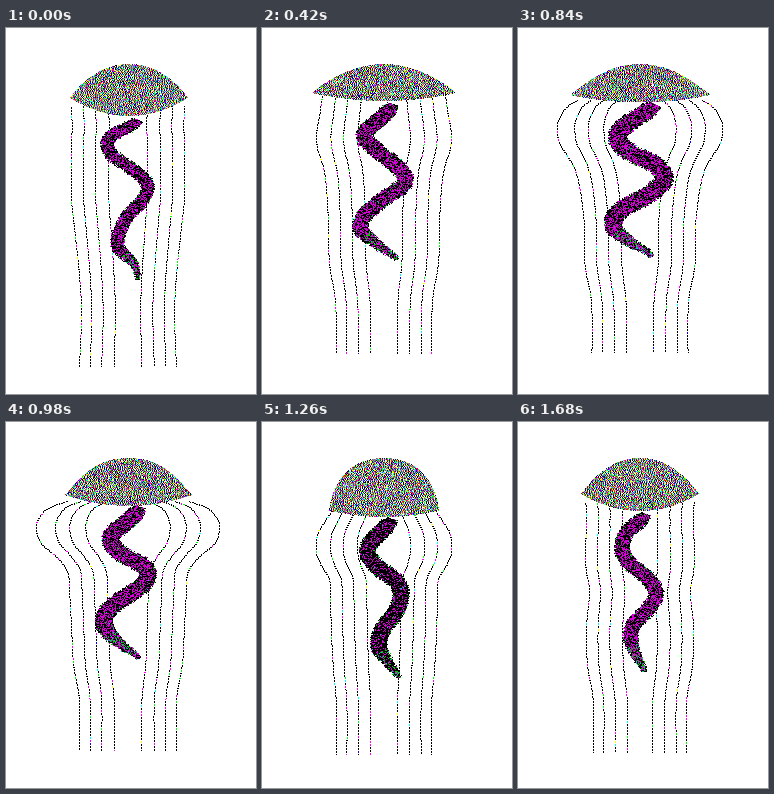
These frames come from a looping animation (250x366 px, 1820 ms). An HTML page with a canvas:

```html
<!DOCTYPE html>
<html lang="en">
<head>
<meta charset="utf-8">
<title>Jellyfish</title>
<style>
html, body { margin: 0; width: 100%; height: 100%; overflow: hidden; background: #fff; }
canvas { display: block; width: 250px; height: 366px; }
</style>
</head>
<body>
<canvas id="stage" width="250" height="366"></canvas>
<script>
const ctx = document.getElementById('stage').getContext('2d');
const STEP = 140, POSES = 13, TOP = 36, MIRROR = 243;
const KEYS = [0, 3, 5, 7, 8, 10, 12];

// left tip x, right tip x, tip y, shoulder dx, shoulder y, crown handle, lower edge y
const BELL = [
  [64, 182, 70, 14, 50, 24, 88],
  [50, 194, 65, 18, 49, 26, 73],
  [45, 199, 61, 25, 47, 26, 65],
  [59, 186, 73, 16, 55, 33, 84],
  [64, 180, 85, 8, 57, 35, 93],
  [70, 174, 92, 0, 61, 33, 97],
  [63, 181, 72, 15, 52, 26, 89]
];

// top y, bottom y, then x of the outer left strand at each FRACTION
const FRACTION = [0, .03, .08, .12, .17, .22, .28, .36, .5, .65, .8, 1];
const STRAND = [
  [78, 338, 65, 65, 66, 65, 65, 65, 65, 65, 69, 73, 75, 73],
  [67, 325, 60, 59, 57, 55, 54, 56, 61, 64, 66, 67, 73, 74],
  [65, 321, 57, 54, 49, 48, 47, 49, 53, 61, 67, 66, 73, 74],
  [79, 328, 61, 41, 31, 30, 35, 49, 61, 63, 65, 67, 73, 73],
  [86, 330, 67, 60, 48, 45, 45, 53, 67, 67, 68, 70, 73, 73],
  [92, 335, 72, 69, 65, 63, 63, 64, 67, 69, 70, 72, 75, 75],
  [80, 330, 67, 68, 68, 68, 67, 67, 68, 71, 68, 69, 75, 75]
];
const REST = [66, 78, 90, 103], SWAY = [1, .8, .74, .65];

// top y, bottom y, width, share of black, then x at equal steps down
const ARM = [
  [92, 251, 11, .58, 132, 104, 103, 124, 141, 136, 121, 113, 112, 127, 131],
  [76, 231, 14, .55, 131, 116, 101, 115, 134, 143, 123, 104, 98, 114, 134],
  [68, 219, 17, .55, 140, 109, 94, 103, 135, 153, 139, 104, 90, 106, 136],
  [85, 236, 15, .55, 134, 119, 103, 113, 139, 138, 117, 99, 99, 113, 132],
  [95, 248, 14, .6, 128, 111, 104, 120, 143, 140, 126, 111, 108, 120, 134],
  [99, 262, 15, .9, 132, 118, 105, 109, 127, 136, 137, 128, 124, 130, 138],
  [92, 249, 13, .55, 128, 110, 103, 109, 128, 138, 130, 115, 112, 118, 126]
];

function random(seed) {
  return () => {
    seed = (seed + 0x6D2B79F5) | 0;
    let t = Math.imul(seed ^ (seed >>> 15), 1 | seed);
    t = (t + Math.imul(t ^ (t >>> 7), 61 | t)) ^ t;
    return ((t ^ (t >>> 14)) >>> 0) / 4294967296;
  };
}

function poseAt(table, n) {
  let i = 0;
  while (i < KEYS.length - 2 && n > KEYS[i + 1]) i++;
  const k = (n - KEYS[i]) / (KEYS[i + 1] - KEYS[i]);
  return table[i].map((v, j) => v + (table[i + 1][j] - v) * k);
}

// Catmull-Rom through a list, t measured in list steps
function curve(list, t) {
  const last = list.length - 1;
  const i = Math.min(Math.floor(t), last - 1), f = t - i;
  const at = j => list[Math.max(0, Math.min(last, j))];
  const a = at(i - 1), b = at(i), c = at(i + 1), d = at(i + 2);
  return b + f / 2 * (c - a + f * (2 * a - 5 * b + 4 * c - d + f * (3 * (b - c) + d - a)));
}

function dot(x, y, color) {
  ctx.fillStyle = color;
  ctx.fillRect(Math.round(x), Math.round(y), 1, 1);
}

function drawStrands(n, rnd) {
  const [top, bottom, ...xs] = poseAt(STRAND, n);
  const tints = ['#f0f', '#0f0', '#0ff', '#ff0', '#00f'];
  REST.forEach((rest, k) => {
    for (const flip of [false, true]) {
      let seen = '', count = Math.floor(rnd() * 3), tint = '#000';
      for (let t = 0; t <= xs.length - 1; t += .01) {
        const left = rest + (curve(xs, t) - REST[0]) * SWAY[k];
        const x = Math.round(flip ? MIRROR - left : left);
        const y = Math.round(top + curve(FRACTION, t) * (bottom - top));
        if (seen === x + ',' + y) continue;
        seen = x + ',' + y;
        if (++count % 3 === 0) {
          tint = rnd() < .14 ? tints[Math.floor(rnd() * rnd() * 5)] : '#000';
          continue;
        }
        dot(x, y, tint);
      }
    }
  });
}

function drawArm(n, rnd) {
  const [top, bottom, width, black, ...xs] = poseAt(ARM, n);
  const last = xs.length - 1, rise = (bottom - top) / last;
  for (let t = 0; t <= last; t += .02) {
    const x = curve(xs, t), y = top + t * rise;
    const dx = curve(xs, Math.min(last, t + .05)) - curve(xs, Math.max(0, t - .05));
    const dy = rise * .1, len = Math.hypot(dx, dy);
    const half = width / 2 * Math.min(1, .2 + (last - t) * .4, .6 + t);
    const from = -half - rnd() * 2.5 + 1, to = half + rnd() * 2.5 - 1;
    const tip = t > last - 1.6;
    for (let s = from; s <= to; s += .8) {
      const edge = Math.abs(s) > half - 1;
      let color = rnd() < black + (edge ? .15 : 0) ? '#000' : '#d800d8';
      if (rnd() < (tip ? .22 : edge ? .09 : .015)) color = rnd() < .7 ? '#0c0' : '#0cc';
      dot(x - dy / len * s, y + dx / len * s, color);
    }
  }
}

function drawBell(n, rnd) {
  const [l, r, tip, dx, shoulder, handle, low] = poseAt(BELL, n);
  const mid = (l + r) / 2;
  const path = new Path2D();
  path.moveTo(l, tip);
  path.bezierCurveTo(l + dx, shoulder, mid - handle, TOP, mid, TOP);
  path.bezierCurveTo(mid + handle, TOP, r - dx, shoulder, r, tip);
  path.quadraticCurveTo(mid, 2 * low - tip, l, tip);
  // each channel tends to flip from one pixel to the next
  for (let y = TOP; y <= low + 1; y++) {
    const on = [0, 0, 0].map(() => rnd() < .5);
    for (let x = Math.floor(l); x <= r; x++) {
      for (let c = 0; c < 3; c++) on[c] = rnd() < (on[c] ? .28 : .75);
      if (ctx.isPointInPath(path, x + .5, y + .5)) {
        dot(x, y, `rgb(${on.map(v => v ? 255 : 0)})`);
      }
    }
  }
}

function draw(n) {
  const rnd = random(n * 977 + 5);
  ctx.fillStyle = '#fff';
  ctx.fillRect(0, 0, 250, 366);
  drawStrands(n, rnd);
  drawArm(n, rnd);
  drawBell(n, rnd);
}

let shown = -1;
const start = performance.now();
function tick() {
  const n = Math.floor((performance.now() - start) / STEP) % POSES;
  if (n !== shown) draw(shown = n);
  requestAnimationFrame(tick);
}
tick();
</script>
</body>
</html>
```
